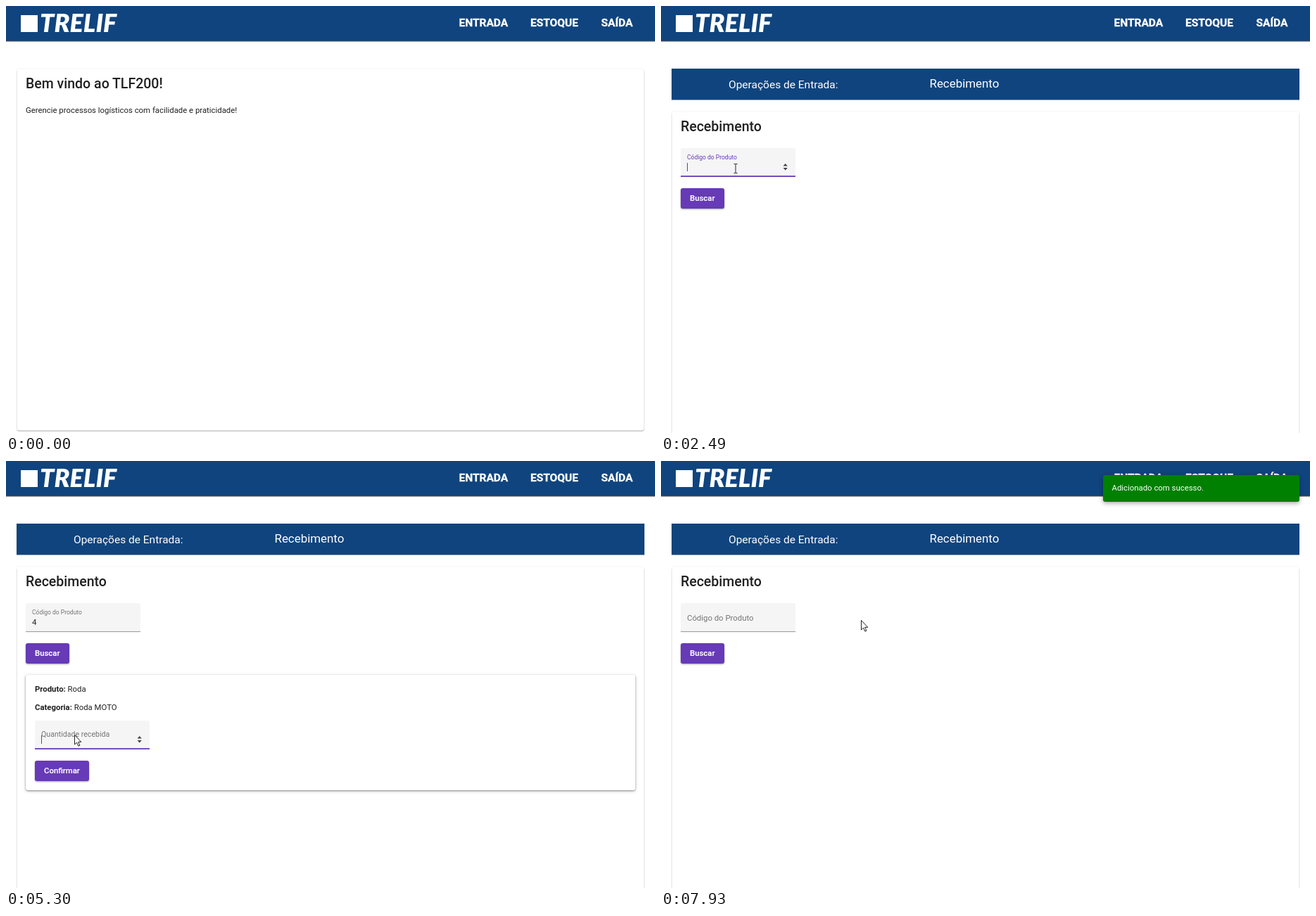
Write an HTML page that moves like this. It is 922x607 px and loops after 8000 ms.

```html
<!DOCTYPE html>
<html lang="pt">
<head>
<meta charset="utf-8">
<style>
  html, body { margin: 0; width: 100%; height: 100%; overflow: hidden; background: #fff; }
  svg { display: block; width: 922px; height: 607px; font: 11.37px Roboto, sans-serif; fill: #212121; }
  .bar { fill: #10447e; }
  .paper { fill: #fff; filter: drop-shadow(0 1px .6px rgba(0,0,0,.3)) drop-shadow(0 0 1px rgba(0,0,0,.08)); }
  .panel { fill: #fff; filter: drop-shadow(0 1px 1.2px rgba(0,0,0,.35)) drop-shadow(0 1px 2px rgba(0,0,0,.2)); }
  .title { font-size: 19.5px; font-weight: 500; }
  .nav text { font-size: 15.5px; font-weight: 700; stroke: #fff; stroke-width: .3px; }
  .white, .nav, .button text { fill: #fff; }
  .button text { font-weight: 500; stroke: #fff; stroke-width: .15px; }
  .button .face { fill: #673ab7; filter: drop-shadow(0 1px 1px rgba(0,0,0,.35)); }
  .brand { font: italic 900 36px Lato, sans-serif; }
  .toast { transform-origin: 767px 39px; }
  .toast rect { fill: #008000; filter: drop-shadow(0 2px 3px rgba(0,0,0,.35)); }
</style>
</head>
<body>
<svg viewBox="0 0 922 607">
  <rect class="bar" width="922" height="49.5" style="filter:drop-shadow(0 1.5px .6px rgba(0,0,0,.7))"/>
  <rect class="white" x="21" y="13" width="24" height="24"/>
  <text class="brand white" x="48" y="37">TRELIF</text>
  <g class="nav">
    <text x="643.5" y="28.5">ENTRADA</text>
    <text x="745" y="28.5">ESTOQUE</text>
    <text x="845.5" y="28.5">SAÍDA</text>
    <rect id="underline" x="644" y="30" width="69.5" height="1.3"/>
  </g>

  <g id="home">
    <rect class="paper" x="15.5" y="89.5" width="891" height="514" rx="3"/>
    <text class="title" x="28" y="117">Bem vindo ao TLF200!</text>
    <text x="28" y="152">Gerencie processos logísticos com facilidade e praticidade!</text>
  </g>

  <g id="receive">
    <rect class="bar" x="15" y="89" width="892" height="44.5"/>
    <text class="white" x="96" y="117" font-size="15.5">Operações de Entrada:</text>
    <text class="white" x="381.5" y="116" font-size="16.9">Recebimento</text>
    <rect class="paper" x="15.5" y="150.5" width="891" height="500" rx="3"/>
    <text class="title" x="28" y="177.5">Recebimento</text>
    <g id="code"></g>
    <g id="search" class="button"></g>
    <g id="product">
      <rect class="panel" x="28" y="304" width="866" height="164" rx="3"/>
      <text x="41" y="328"><tspan font-weight="700">Produto:</tspan> Roda</text>
      <text x="41" y="354"><tspan font-weight="700">Categoria:</tspan> Roda MOTO</text>
      <g id="amount"></g>
      <g id="confirm" class="button"></g>
    </g>
  </g>

  <g id="toast" class="toast">
    <rect x="628" y="20" width="279" height="38" rx="3"/>
    <text class="white" x="640.5" y="42">Adicionado com sucesso.</text>
  </g>

  <g id="pointer">
    <circle id="press" r="10" cy="1" fill="#ff0" opacity=".62"/>
    <path id="arrow" d="M.5.5V14l3-2.8 2.4 5 2-.9-2.3-4.9h4.2z" fill="#fff" stroke="#222"/>
    <path id="hand" d="M-1.5 1q1.500-2 3 0v6q2-1 2.500.5 2-.8 2.500.8 2-.5 2 1.200v4q0 2-1.500 4v2h-6v-2l-4.500-6q-.5-2.200 2-1z" fill="#fff" stroke="#222"/>
    <path id="beam" d="M-2.500-6.500h2l.5.5.5-.5h2M0-6V6M-2.500 6.500h2l.5-.5.5.5h2" fill="none" stroke="#222"/>
  </g>
</svg>
<script>
const LOOP = 8000;
const $ = id => document.getElementById(id);
const clamp = v => Math.max(0, Math.min(1, v));
const ramp = (t, start, length) => clamp((t - start) / length);
const smooth = p => p * p * (3 - 2 * p);
const between = (t, a, b) => t >= a && t < b;
const show = (el, on) => el.style.display = on ? '' : 'none';

function makeField(id, x, y, label) {
  const g = $(id);
  g.setAttribute('transform', `translate(${x} ${y})`);
  g.innerHTML = `
    <path d="M0 41V3q0-3 3-3h157q3 0 3 3v38z" fill="#f5f5f5"/>
    <rect class="line" width="163"/>
    <text class="label">${label}</text>
    <text class="value" x="9" y="31"></text>
    <rect class="caret" y="21" width="1" height="12"/>
    <path class="spin" d="M145.500 25.500l3.200-3.500 3.200 3.500zm0 2.500l3.200 3.500 3.200-3.500z" fill="#444"/>`;
  const part = name => g.querySelector('.' + name);
  const [line, text, value, caret, spin] = ['line', 'label', 'value', 'caret', 'spin'].map(part);

  return ({ t, focus, blur, typed, reset, input }) => {
    const active = between(t, focus, blur);
    const up = t < reset ? smooth(ramp(t, focus, 150)) : 0;
    const filled = between(t, typed, reset);
    const chars = filled ? input.length : 0;
    line.setAttribute('y', active ? 39.2 : 40.2);
    line.setAttribute('height', active ? 1.8 : .9);
    line.setAttribute('fill', active ? '#673ab7' : '#8a8a8a');
    text.setAttribute('transform', `translate(9 ${25 - 9 * up}) scale(${1 - .25 * up})`);
    text.setAttribute('fill', active && up > .5 ? '#673ab7' : '#757575');
    value.textContent = filled ? input : '';
    caret.setAttribute('x', 9 + 6.4 * chars);
    caret.setAttribute('fill', chars ? '#222' : '#673ab7');
    show(caret, active && (t - (filled ? typed : focus)) % 1060 < 530);
    show(spin, active);
  };
}

function makeButton(id, x, y, width, label) {
  const g = $(id);
  g.setAttribute('transform', `translate(${x} ${y})`);
  g.innerHTML = `
    <clipPath id="${id}Clip"><rect width="${width}" height="29" rx="3"/></clipPath>
    <rect class="face" width="${width}" height="29" rx="3"/>
    <g clip-path="url(#${id}Clip)"><circle fill="#fff"/></g>
    <text x="13" y="18">${label}</text>`;
  const ripple = g.querySelector('circle');

  return (t, start, cx, cy) => {
    const grow = 1 - (1 - ramp(t, start, 225)) ** 3;
    ripple.setAttribute('cx', cx);
    ripple.setAttribute('cy', cy);
    ripple.setAttribute('r', 49 * grow);
    ripple.setAttribute('opacity', .11 * (1 - ramp(t, start + 225, 400)));
  };
}

const drawCode = makeField('code', 28, 202, 'Código do Produto');
const drawAmount = makeField('amount', 41, 369, 'Quantidade recebida');
const drawSearch = makeButton('search', 28, 259, 62, 'Buscar');
const drawConfirm = makeButton('confirm', 41, 426, 77, 'Confirmar');

// time, x, y of the pointer tip
const path = [
  [260, 856, 563], [1030, 648, 28], [1160, 661, 21], [1400, 661, 21],
  [1860, 153, 197], [1930, 153, 197], [2130, 106, 231], [3550, 106, 231],
  [3850, 60, 270], [4370, 60, 270], [4950, 97, 389], [6580, 97, 389],
  [6950, 88, 441], [7400, 88, 441], [7930, 284, 226]
];
const presses = [[1230, 1370], [2230, 2340], [3850, 3960], [5160, 5290], [7060, 7170]];

function tip(t) {
  const i = path.findIndex(k => k[0] > t);
  if (i < 0) return path[path.length - 1].slice(1);
  if (!i) return path[0].slice(1);
  const [a, b] = [path[i - 1], path[i]];
  const p = smooth(ramp(t, a[0], b[0] - a[0]));
  return [a[1] + (b[1] - a[1]) * p, a[2] + (b[2] - a[2]) * p];
}

function draw(t) {
  const home = t < 1440;
  const done = 7300;
  show($('home'), home);
  show($('receive'), !home);
  show($('product'), between(t, 4180, done));

  drawCode({ t, focus: 2280, blur: 3860, typed: 3090, reset: done, input: '4' });
  drawAmount({ t, focus: 5250, blur: 7060, typed: 6120, reset: done, input: '15' });
  drawSearch(t, 3900, 32, 11);
  drawConfirm(t, 7130, 47, 15);

  const pop = smooth(ramp(t, done, 150));
  show($('toast'), pop > 0);
  $('toast').style.opacity = pop;
  $('toast').style.transform = `scale(${.8 + .2 * pop})`;

  const [x, y] = tip(t);
  const onLink = t >= 260 && home && y < 33;
  const onField = !home && x > 28 && x < 191 && y > 202 && y < 243 && t < 7000
    || between(t, 5400, 6700) && y < 410;
  show($('pointer'), t >= 260);
  $('pointer').setAttribute('transform', `translate(${x} ${y})`);
  show($('underline'), onLink);
  show($('hand'), onLink);
  show($('beam'), onField);
  show($('arrow'), !onLink && !onField);
  show($('press'), presses.some(p => between(t, ...p)));
}

const start = performance.now();
function tick() {
  draw((performance.now() - start) % LOOP);
  requestAnimationFrame(tick);
}
tick();
</script>
</body>
</html>
```
